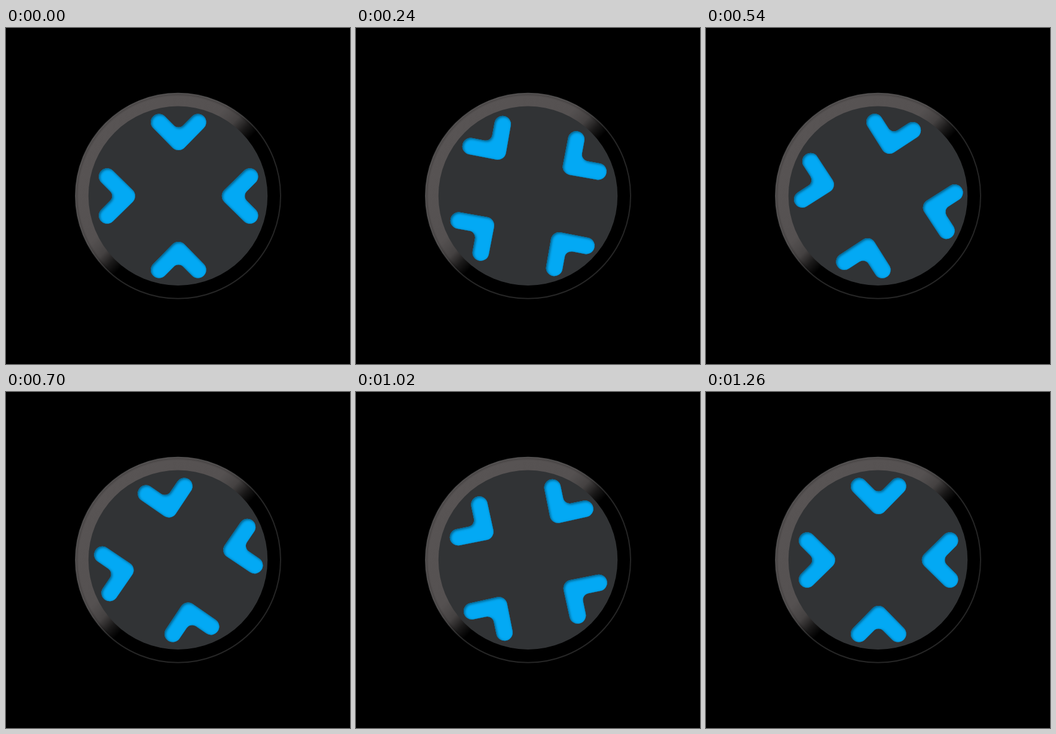
An HTML page with a canvas for the animation above (1280 ms loop, 575 by 561 pixels).

```html
<!DOCTYPE html>
<html lang="en">
<head>
<meta charset="utf-8">
<title>Rotating dial</title>
<style>
  html, body { margin: 0; width: 100%; height: 100%; overflow: hidden; background: #000; }
  canvas { display: block; }
</style>
</head>
<body>
<canvas id="stage" width="575" height="561"></canvas>
<script>
const ctx = document.getElementById('stage').getContext('2d');
const LOOP = 1280, STEP = 20, SPEED = 0.144;
const CX = 288.3, CY = 280.5;
const rad = deg => deg * Math.PI / 180;

// Chevron above the origin, pointing down at it.
function makeChevron() {
  const x = 32.5, y = -123.3, r = 13.8, side = r * Math.SQRT1_2;
  const path = new Path2D();
  path.arc(-x, y, r, rad(135), rad(315));
  path.arcTo(0, y + x - r * Math.SQRT2, x - side, y - side, 11);
  path.arc(x, y, r, rad(225), rad(405));
  path.arc(0, y + x + 0.3, 14, rad(45), rad(135));
  path.closePath();
  return path;
}
const chevron = makeChevron();

function circle(radius, fill) {
  ctx.beginPath();
  ctx.arc(287.5, 280.3, radius, 0, Math.PI * 2);
  ctx.fillStyle = fill;
  ctx.fill();
}

const bevel = ctx.createLinearGradient(165, 159, 409, 402);
bevel.addColorStop(0, '#585454');
bevel.addColorStop(0.36, '#555151');
bevel.addColorStop(0.44, '#454242');
bevel.addColorStop(0.5, '#1a1919');
bevel.addColorStop(0.55, '#000');

const edge = ctx.createRadialGradient(287.5, 280.3, 166, 287.5, 280.3, 172);
edge.addColorStop(0, 'rgba(0,0,0,0)');
edge.addColorStop(1, 'rgba(0,0,0,.25)');

function drawDial() {
  ctx.fillStyle = '#000';
  ctx.fillRect(0, 0, 575, 561);
  circle(171.5, bevel);
  circle(171.5, edge);
  ctx.strokeStyle = 'rgba(255,255,255,.15)';
  ctx.lineWidth = 2;
  ctx.stroke();
  circle(149.7, '#313335');
}

function drawChevrons(angle) {
  const shape = new Path2D();
  for (let k = 0; k < 4; k++) {
    // The side pair sits slightly closer to the centre.
    const place = new DOMMatrix().translate(CX, CY).rotate(angle + 90 * k).translate(0, k % 2 * 4);
    shape.addPath(chevron, place);
  }
  ctx.fillStyle = '#03a9f4';
  ctx.fill(shape);

  // Inset shadow, lit from the upper left.
  const outside = new Path2D();
  outside.rect(-50, -50, 675, 661);
  outside.addPath(shape);
  ctx.save();
  ctx.clip(shape);
  ctx.shadowColor = 'rgba(0,0,0,.5)';
  ctx.shadowBlur = 4;
  ctx.shadowOffsetX = ctx.shadowOffsetY = 1.5;
  ctx.fillStyle = '#03a9f4';
  ctx.fill(outside, 'evenodd');
  ctx.restore();
}

function render(now) {
  const time = Math.floor(now % LOOP / STEP) * STEP;
  drawDial();
  drawChevrons(-Math.min(180, time * SPEED));
}

const start = performance.now();
function tick() {
  render(performance.now() - start);
  requestAnimationFrame(tick);
}
tick();
</script>
</body>
</html>
```
